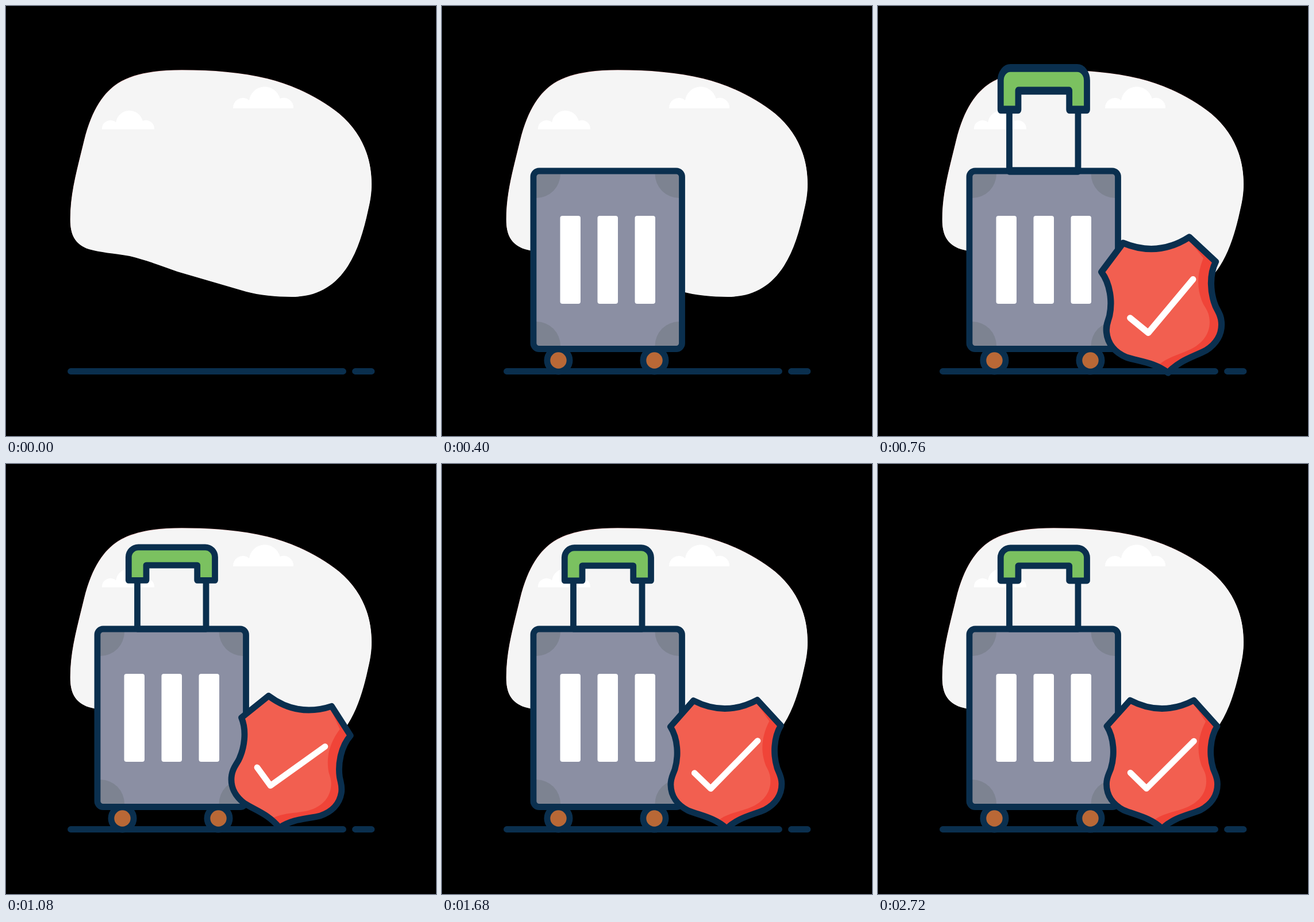
An HTML page that plays this animation: 748x748 px, repeating every 3080 ms.

```html
<!DOCTYPE html>
<html lang="en">
<head>
<meta charset="utf-8">
<title>Safe luggage</title>
<style>
  html, body { margin: 0; width: 100%; height: 100%; overflow: hidden; background: #000; }
  svg { display: block; width: 100vw; height: 100vh; }
  .line { stroke: #0a2f4e; stroke-width: 10.8; stroke-linecap: round; stroke-linejoin: round; }
</style>
</head>
<body>
<svg viewBox="0 0 748 748">
  <defs>
    <path id="blob" d="M112 372C112 325 124 285 136 235C150 178 172 150 195 135C222 118 262 112 306 112C360 112 410 116 455 127C500 138 545 160 580 188C620 222 636 265 636 310C636 325 634 338 630 355C622 392 612 425 595 452C572 488 540 506 497 506C470 506 440 503 418 497L298 462C265 450 240 441 215 435C185 430 165 429 144 423C120 415 112 398 112 372Z"/>
    <path id="cloud" d="M395 178A17 17 0 0 1 423 164A27.3 27.3 0 0 1 476.5 161A17 17 0 0 1 500 178Z"/>
    <path id="badge" d="M438.5 411Q494 440 549.5 411L590 456C577 477 576 507 583 530C587 541 590.5 545 590.5 557C590.5 578 578 593 561 602C540 611 516 614 494 634C472 614 448 611 427 602C410 593 397.5 578 397.5 557C397.5 545 401 541 405 530C412 507 411 477 398 456Z"/>
    <rect id="box" x="159" y="287" width="258.5" height="309.5" rx="10"/>
    <clipPath id="inBadge"><use href="#badge"/></clipPath>
    <clipPath id="inBox"><use href="#box"/></clipPath>
  </defs>

  <rect width="748" height="748"/>
  <use href="#blob" fill="#fbd3d3" transform="translate(-.3 -.8)"/>
  <use href="#blob" fill="#f5f5f5"/>
  <use href="#cloud" fill="#fff"/>
  <use href="#cloud" fill="#fff" transform="translate(-175.5 60.2) scale(.867)"/>
  <path class="line" d="M112.5 635.5H586.5M607.5 635.5H636"/>

  <g id="suitcase">
    <g class="line" fill="#b96836">
      <circle cx="202.5" cy="616.5" r="19.6"/>
      <circle cx="369.5" cy="616.5" r="19.6"/>
    </g>
    <use href="#box" fill="#8b8fa3"/>
    <g fill="#7d8391" clip-path="url(#inBox)">
      <circle cx="164" cy="292" r="42"/>
      <circle cx="412.5" cy="292" r="42"/>
      <circle cx="164" cy="591" r="42"/>
      <circle cx="412.5" cy="591" r="42"/>
    </g>
    <use href="#box" class="line" fill="none"/>
    <g fill="#fff">
      <rect x="205.5" y="365" width="35.5" height="153" rx="4"/>
      <rect x="270.5" y="365" width="35.5" height="153" rx="4"/>
      <rect x="335.5" y="365" width="35.5" height="153" rx="4"/>
    </g>
  </g>

  <g id="handle" class="line">
    <path fill="none" d="M228.5 203V287H348V203"/>
    <path fill="#7bc160" d="M213.3 203V163a17 17 0 0 1 17-17H346.5a17 17 0 0 1 17 17V203H332.7V177H244V203Z"/>
  </g>

  <g id="shield">
    <use href="#badge" fill="#f04438"/>
    <path clip-path="url(#inBadge)" fill="#f25f50" d="M380 400H540L549 417L570 448C556 475 554 500 563 525C568 535 571 540 571 552C571 575 555 589 540 596C520 605 500 606 482 618L380 622Z"/>
    <use href="#badge" class="line" fill="none"/>
    <path d="M439 537L467 564.5L549.5 482" fill="none" stroke="#fff" stroke-width="10.5" stroke-linecap="round" stroke-linejoin="round"/>
  </g>
</svg>
<script>
const LOOP = 3080, STEP = 40;
const [suitcase, handle, shield] =
  ["suitcase", "handle", "shield"].map(id => document.getElementById(id));

const ease = p => (1 - Math.cos(Math.PI * Math.min(1, Math.max(0, p)))) / 2;

// Grows from 0 to 1 between 400 and 600 ms, then rings out around 1.
function spring(t, amp) {
  if (t < 600) return Math.max(0, (t - 400) / 200);
  const s = (t - 600) / 1000;
  return 1 + amp * Math.sin(2 * Math.PI * s) * Math.exp(-5 * s);
}

// Main swings as [time, degrees]; a damped wobble follows the last one.
const swings = [[400, 0], [600, 19.5], [850, -15], [1070, 9.4], [1290, -4]];

function tilt(t) {
  for (let i = 1; i < swings.length; i++) {
    const [t0, a] = swings[i - 1], [t1, b] = swings[i];
    if (t < t1) return a + (b - a) * ease((t - t0) / (t1 - t0));
  }
  const s = (t - 1290) / 1000;
  return -4 * Math.cos(14.3 * s) * Math.exp(-4.2 * s);
}

function draw(t) {
  const x = 438 * (ease(t / 400) - 1);
  suitcase.setAttribute("transform", `translate(${x} 0)`);

  const shown = t > 400 ? "visible" : "hidden";
  handle.setAttribute("visibility", shown);
  shield.setAttribute("visibility", shown);
  handle.setAttribute("transform",
    `translate(0 287) scale(1 ${spring(t, 0.712)}) translate(0 -287)`);
  shield.setAttribute("transform",
    `translate(494 520) rotate(${tilt(t)}) scale(${spring(t, 0.105)}) translate(-494 -520)`);
}

const start = performance.now();
function tick() {
  const t = (performance.now() - start) % LOOP;
  draw(Math.floor(t / STEP) * STEP);
  requestAnimationFrame(tick);
}
draw(0);
requestAnimationFrame(tick);
</script>
</body>
</html>
```
